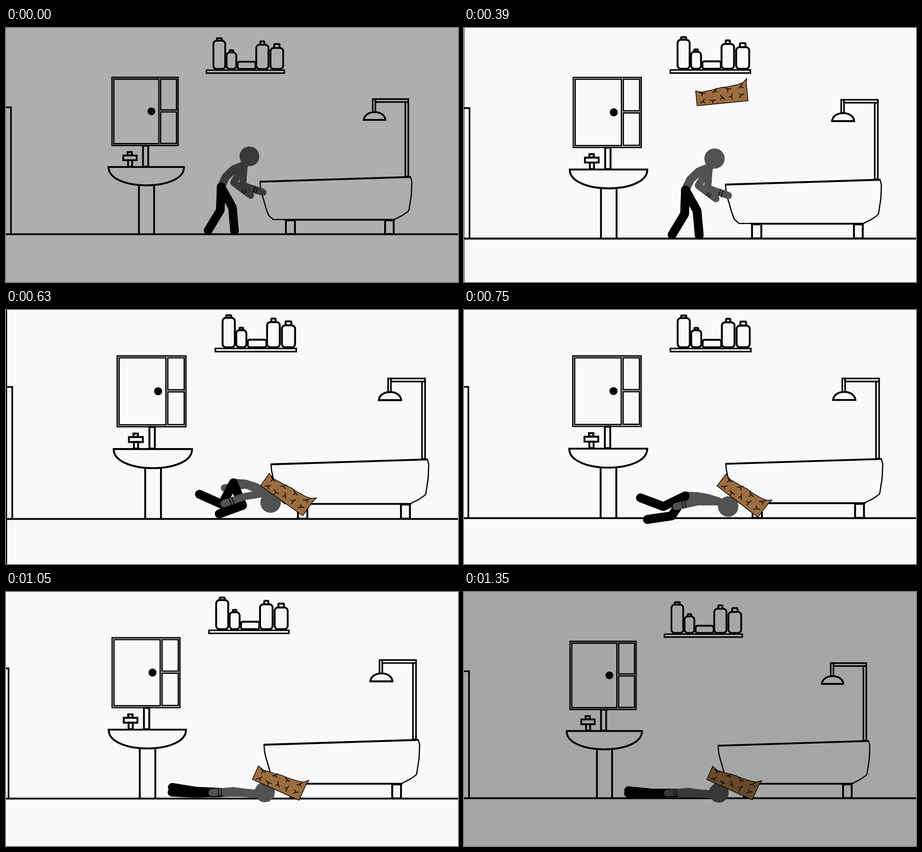
These frames come from a looping animation (998 by 561 pixels, 2100 ms). An HTML page with a canvas:

```html
<!DOCTYPE html>
<html lang="en">
<head>
<meta charset="utf-8">
<title>Falling log</title>
<style>
  html, body { margin: 0; width: 100%; height: 100%; overflow: hidden; background: #f9f9f9; }
  canvas { display: block; }
</style>
</head>
<body>
<canvas id="stage" width="998" height="561"></canvas>
<script>
const W = 998, H = 561, LOOP = 2100, HOLD = 150, STEP = 30, LAST = 41;
const PAPER = '#f9f9f9', SKIN = '#525252', WOOD = '#9c6d3f', INK = '#000';
const ctx = document.getElementById('stage').getContext('2d');

// Moments of the story, in steps.
const TOUCH = 10.4, HIT = 12, CRUMPLE = 17, LYING = 25, REST = 31;

// step, zoom, x, y
const camera = [
  [0, 1, 0, 0],
  [5, 1.016, 0, -0.2],
  [HIT, 1.0363, 1.5, -5],
  [CRUMPLE, 1.039, 2.4, -11.8],
  [LYING, 1.0285, -5.9, -10.5],
  [35, 1.0235, -5.5, -11],
  [LAST, 1, 0, 0]
];

// step, lower left corner, angle
const logPath = [
  [6, 500, -40, -5.6],
  [TOUCH, 500, 268, -5.6],
  [HIT, 500.3, 314.6, -5.6],
  [CRUMPLE, 538.6, 384.7, 35.5],
  [LYING, 545.4, 388.4, 39.5],
  [REST, 536, 414, 24.2]
];

// step, hip, then angles: spine start and end, head,
// back leg, front leg, near arm, far arm (upper and lower part)
const poses = [
  [TOUCH, 475, 351, -65, -22, -59, 92, 121, 61, 85, 94, 19, 121, 37],
  [HIT, 477, 359, -49, -4, -18, 89, 131, 47, 95, 112, 53, 137, 72],
  [CRUMPLE, 481, 379, 4, 31, 63, 118, 204, 68, 160, 171, 161, 203, 172],
  [LYING, 467, 444, 0, 4, -8, 180, 186, 177, 182, 188, 175, 181, 178]
];
const BONE = { spine: 24.5, head: 22.5, thigh: 51.5, shin: 52.5, upper: 45, fore: 47 };

const lerp = (a, b, k) => a + (b - a) * k;
const progress = (n, a, b) => Math.max(0, Math.min(1, (n - a) / (b - a)));

// Linear interpolation over rows that start with their step.
function sample(rows, n) {
  const i = Math.max(1, rows.findIndex(r => r[0] >= n));
  const [a, b] = n > rows.at(-1)[0] ? rows.slice(-2) : [rows[i - 1], rows[i]];
  const k = progress(n, a[0], b[0]);
  return a.slice(1).map((v, j) => lerp(v, b[j + 1], k));
}

function stroke(d, width = 3.5) {
  ctx.lineWidth = width;
  ctx.strokeStyle = INK;
  ctx.stroke(new Path2D(d));
}

function box(x1, y1, x2, y2, width = 3.5, r = 0) {
  ctx.lineWidth = width;
  ctx.strokeStyle = INK;
  ctx.beginPath();
  ctx.roundRect(x1, y1, x2 - x1, y2 - y1, r);
  ctx.stroke();
}

function disc(x, y, r, color) {
  ctx.fillStyle = color;
  ctx.beginPath();
  ctx.arc(x, y, r, 0, 7);
  ctx.fill();
}

function bottle(x, width, top, cap, capHeight) {
  const mid = x + width / 2;
  box(x, top, x + width, 90.5, 4, 7);
  box(mid - cap / 2, top - capHeight, mid + cap / 2, top, 4, 1.5);
}

function drawRoom() {
  ctx.lineCap = 'butt';
  ctx.lineJoin = 'miter';
  stroke('M-1.5 -20V600', 3);
  stroke('M-1 455.5H1010', 4);
  stroke('M-1 175H11V455');

  // shelf
  box(442.5, 93, 614.5, 99.7, 3.2);
  bottle(458, 26, 28, 11, 5.5);
  bottle(487, 21.5, 54, 8, 5);
  box(511.5, 74.5, 551, 90.5, 4, 4);
  bottle(552.5, 27, 37, 9, 7.5);
  bottle(584, 28, 44, 12, 8.5);

  // cabinet
  box(234, 109, 380, 259.5, 2.8);
  box(238, 113, 337.5, 255.5, 2.8);
  box(341.5, 113, 376.5, 181, 2.8);
  box(341.5, 185.3, 376.5, 255, 2.8);
  disc(321, 184, 8.6, INK);

  // sink
  box(302.5, 260, 314, 306, 4);
  box(268.5, 274, 278, 281, 4);
  box(259, 281.5, 288.5, 292, 4);
  box(269.5, 292, 278.5, 306, 4);
  stroke('M226.5 307H393C394 361 226 361 226.5 307Z', 4);
  stroke('M293.5 347V455M327 347V455', 4);

  // shower
  box(881.7, 163.5, 888.3, 328, 3.4);
  box(815.5, 157, 888.3, 163.5, 3.4);
  box(809.7, 157, 815.7, 186, 3.4);
  stroke('M790 203H837.5C836 180 792 180 790 203Z', 4);

  // bath
  ctx.lineJoin = 'round';
  stroke('M560 339.5L894 329', 4);
  stroke('M561 339L562 352L565 367L569 380L574 398L580 414L590 423H617', 2.6);
  stroke('M893 329L896 339L895 368L890 401L888 405L875 414L857 423', 2.6);
  stroke('M615 423.5H859', 4);
  ctx.lineJoin = 'miter';
  box(618, 425, 638, 455, 4);
  box(837, 425, 856, 455, 4);
}

// Joints of a chain of [length, angle] bones.
function chain(start, ...bones) {
  const points = [start];
  for (const [length, angle] of bones) {
    const [x, y] = points.at(-1), a = angle * Math.PI / 180;
    points.push([x + length * Math.cos(a), y + length * Math.sin(a)]);
  }
  return points;
}

function limb(points, width, color) {
  ctx.lineCap = ctx.lineJoin = 'round';
  ctx.lineWidth = width;
  ctx.strokeStyle = color;
  ctx.stroke(new Path2D('M' + points.join('L')));
}

function leg(hip, thigh, shin) {
  limb(chain(hip, [BONE.thigh, thigh], [BONE.shin, shin]), 19, INK);
}

function arm(neck, upper, fore) {
  const points = chain(neck, [BONE.upper, upper], [BONE.fore, fore]);
  limb(points, 15.5, SKIN);
  ctx.lineCap = 'butt';
  for (const gap of [14, 20]) {
    const [, mid] = chain(points[2], [gap, fore + 180]);
    const [, a, b] = chain(mid, [8, fore + 90], [16, fore - 90]);
    stroke(`M${a}L${b}`, 1.6);
  }
}

function drawFigure(n) {
  const [x, y, spineA, spineB, head, backT, backS, frontT, frontS, nearU, nearF, farU, farF] = sample(poses, n);
  // The legs bounce once after the fall.
  const bounce = Math.sin(Math.PI * progress(n, CRUMPLE, 33));
  const hip = [x, y - 5 * bounce];
  const spine = chain(hip, ...[0, 0.5, 1].map(k => [BONE.spine, lerp(spineA, spineB, k)]));
  const neck = spine.at(-1);

  arm(neck, farU, farF);
  limb(spine, 18, SKIN);
  leg(hip, backT + 7 * bounce, backS + 8 * bounce);
  leg(hip, frontT + 2 * bounce, frontS + bounce);
  arm(neck, nearU, nearF);
  disc(...chain(neck, [BONE.head, head])[1], 21.8, SKIN);
}

const bark = new Path2D('M0 0V-32L13 -28L38 -31L55 -34L67 -34L92 -37L103 -40L112 -48L110 -37V0Z');

function crack(x, y, angle) {
  ctx.save();
  ctx.translate(x, y);
  ctx.rotate(angle);
  stroke('M-6 1L0 0L6 -3M0 0L3 5', 1.7);
  ctx.restore();
}

function drawLog(n) {
  const [x, y, angle] = sample(logPath, n);
  ctx.save();
  ctx.translate(x, y);
  ctx.rotate(angle * Math.PI / 180);
  ctx.lineCap = ctx.lineJoin = 'round';
  ctx.fillStyle = WOOD;
  ctx.fill(bark);
  ctx.lineWidth = 1.4;
  ctx.strokeStyle = INK;
  ctx.stroke(bark);
  for (let i = 0; i < 4; i++) crack(13 + 28 * i, -26 - 2 * i, 0.6 - 1.1 * (i % 2));
  for (let i = 0; i < 5; i++) crack(13 + 21 * i, -8 - 5 * (i > 1), 0.8 * i - 0.4);
  ctx.restore();
}

function draw() {
  const t = performance.now() % LOOP;
  const n = Math.max(0, Math.min(LAST, Math.floor((t - HOLD) / STEP) + 1));
  const [zoom, x, y] = sample(camera, n);
  const glow = Math.min(1, 0.7 + 0.053 * n, 0.667 + 0.0583 * (LAST - n));

  ctx.setTransform(1, 0, 0, 1, 0, 0);
  ctx.fillStyle = PAPER;
  ctx.fillRect(0, 0, W, H);
  ctx.setTransform(zoom, 0, 0, zoom, x, y);
  drawRoom();
  drawFigure(n);
  drawLog(n);
  ctx.setTransform(1, 0, 0, 1, 0, 0);
  ctx.fillStyle = `rgba(0,0,0,${1 - glow})`;
  ctx.fillRect(0, 0, W, H);
  requestAnimationFrame(draw);
}
draw();
</script>
</body>
</html>
```
